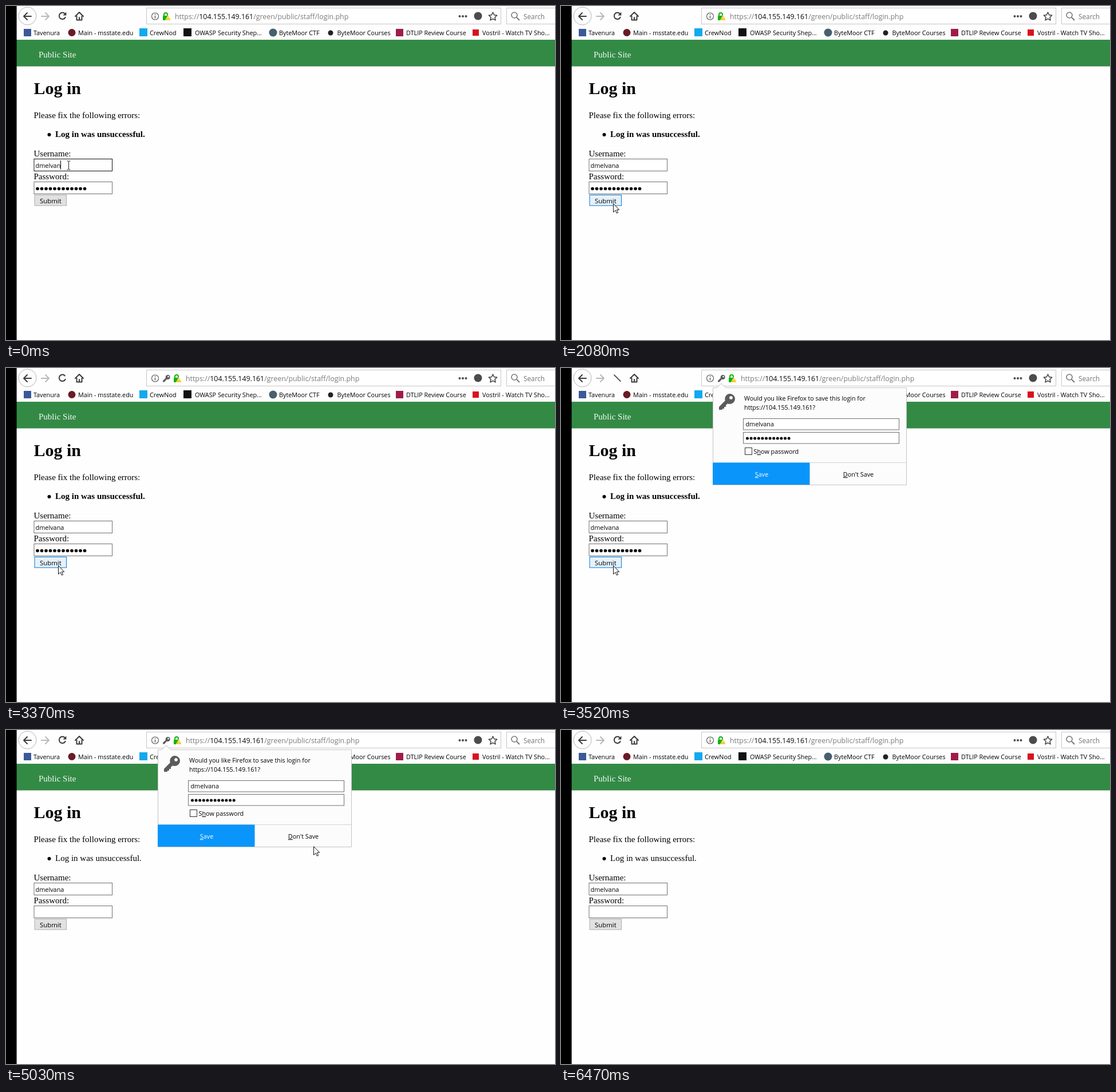
Write an HTML page that moves like this. It is 959 by 584 pixels and loops after 7310 ms.

```html
<!DOCTYPE html>
<html lang="en">
<head>
<meta charset="utf-8">
<title>Log in</title>
<style>
html, body { margin: 0; width: 100%; height: 100%; overflow: hidden; background: #fefefe; }
svg { display: block; }
text { font: 10.8px "Open Sans", "Noto Sans", sans-serif; white-space: pre; }
.page text { font: 15px "Liberation Serif", "Times New Roman", serif; }
.page .ui { font: 10.9px "Open Sans", "Noto Sans", sans-serif; }
.page .submit { font-size: 11.4px; }
.page .title { font-size: 30px; font-weight: bold; }
.url { font-size: 12.4px; fill: #7b7b7b; }
.url tspan { fill: #0c0c0d; }
.search { font-size: 11.8px; fill: #737373; }
.ask { font-size: 10.65px; }
.icon { fill: none; stroke: #3c3c40; stroke-width: 2; stroke-linecap: round; stroke-linejoin: round; }
.box { fill: #fff; stroke: #707070; }
.mid { text-anchor: middle; }
.u { text-decoration: underline; }
</style>
</head>
<body>
<svg width="959" height="584" viewBox="0 0 959 584">
  <defs>
    <g id="key">
      <path fill-rule="evenodd" d="M19 0a9 9 0 0 1 0 18a9 9 0 0 1-4-.8L12 20v3H9v3H6v2H0v-5L10.800 12A9 9 0 0 1 19 0zM21 4a3 3 0 1 0 .01 0z" fill="#5b5b5e"/>
    </g>
  </defs>
  <rect width="959" height="584" fill="#fefefe"/>

  <!-- toolbar -->
  <circle cx="37.500" cy="17.500" r="15.500" fill="#fdfdfd" stroke="#b4b4b4"/>
  <path class="icon" d="M44 18H31M37 12l-6 6l6 6"/>
  <path class="icon" d="M62 18H75M69 12l6 6l-6 6" style="stroke:#b9b9b9"/>
  <g class="icon" transform="translate(.4 -.4)">
    <path id="arc" d="M103.300 20.200A5.700 5.700 0 1 1 102.500 14"/>
    <path id="head" d="M105 11v6h-6z" fill="#3c3c40" stroke="none"/>
    <path id="slash" d="M92.500 12.500L103.500 23.500" stroke-width="1.500"/>
    <path id="cross" d="M103.500 12.500L92.500 23.500" stroke-width="1.500"/>
  </g>
  <path class="icon" d="M121 18l7-7l7 7M123.500 18v6.500h9v-6.500M128 24v-4"/>
  <rect x="245.500" y="3.500" width="619" height="28" fill="#fff" stroke="#c6c6c6"/>
  <circle cx="260.500" cy="18" r="6" fill="none" stroke="#5e5e5e" stroke-width="1.200"/>
  <path d="M260.500 17v4.500M260.500 14v1.600" stroke="#5e5e5e" stroke-width="1.500"/>
  <use id="urlKey" href="#key" transform="translate(274 12) scale(.45)"/>
  <g id="address">
    <path d="M276 17v-2a3 3 0 0 1 6 0v2" fill="none" stroke="#12b20f" stroke-width="2"/>
    <rect x="274" y="17" width="10" height="8" rx="1" fill="#12b20f"/>
    <path d="M283 16l4.800 9h-9.600z" fill="#ffbf00" stroke="#fff" stroke-width=".6"/>
    <path d="M283 19v3M283 23v1" stroke="#fff"/>
    <text class="url" x="295" y="23">https://<tspan>104.155.149.161</tspan>/green/public/staff/login.php</text>
  </g>
  <g fill="#4b4b4f">
    <circle cx="792.500" cy="18" r="2"/><circle cx="798" cy="18" r="2"/><circle cx="803.500" cy="18" r="2"/>
    <circle cx="824.500" cy="17.500" r="7"/>
  </g>
  <path class="icon" style="stroke-width:1.500" d="M850.500 11l2.200 4.700l5 .6l-3.700 3.500l1 5l-4.500-2.500l-4.500 2.500l1-5l-3.700-3.500l5-.6z"/>
  <path d="M960 3.500H874.500V31.500H960" fill="#fff" stroke="#c6c6c6"/>
  <path d="M892 20l5 5" stroke="#777" stroke-width="2"/>
  <circle cx="888" cy="16" r="5" fill="none" stroke="#777" stroke-width="1.600"/>
  <text class="search" x="904" y="23">Search</text>

  <!-- bookmarks -->
  <rect x="31" y="40" width="13" height="13" fill="#3b5998"/>
  <circle cx="115" cy="46.500" r="6.500" fill="#6b1a26"/>
  <rect x="233" y="39" width="14" height="14" fill="#12a9ee"/>
  <rect x="310" y="39" width="14" height="14" fill="#111"/>
  <circle cx="466.500" cy="46.500" r="7" fill="#46606e"/>
  <circle cx="567" cy="47" r="4.500" fill="#222"/>
  <rect x="681" y="40" width="13" height="13" fill="#a01c46"/>
  <rect x="815" y="41" width="11" height="11" fill="#d8131c"/>
  <g id="bookmarks" fill="#000"></g>

  <!-- page -->
  <rect x="18" y="59" width="941" height="46" fill="#338a45"/>
  <path d="M18 105H959" stroke="#2f8040"/>
  <rect width="18.600" height="584"/>
  <g class="page">
    <text x="57" y="90" fill="#f4faf5">Public Site</text>
    <text class="title" x="48.500" y="154">Log in</text>
    <text x="48.500" y="196">Please fix the following errors:</text>
    <circle cx="75.500" cy="225" r="3"/>
    <text id="error" x="86" y="229">Log in was unsuccessful.</text>
    <text x="48.500" y="263">Username:</text>
    <rect id="user" class="box" x="49" y="267.500" width="136.500" height="21"/>
    <text id="name" class="ui" x="51.500" y="283"></text>
    <path id="caret" d="M.5 270v16" stroke="#000"/>
    <text x="48.500" y="303">Password:</text>
    <rect id="pass" class="box" x="49" y="307.500" width="136.500" height="21"/>
    <g id="dots"></g>
    <rect id="button" x="50" y="330.500" width="55.500" height="18.500"/>
    <text id="label" class="ui submit" y="345">Submit</text>
  </g>

  <!-- save prompt -->
  <g id="prompt">
    <path d="M265.500 34.500H272L280 27L288 34.500H603.500V204.500H265.500Z" fill="#fcfcfd" stroke="#c3c3c5"/>
    <use href="#key" transform="translate(276 45)"/>
    <text class="ask" x="320" y="57">Would you like Firefox to save this login for</text>
    <text x="320" y="73">https://104.155.149.161?</text>
    <rect class="box" x="318.500" y="88.500" width="272" height="19.500"/>
    <text x="322.500" y="102">dmelvana</text>
    <rect class="box" x="318.500" y="112.500" width="272" height="19.500"/>
    <g id="promptDots"></g>
    <rect class="box" x="321.500" y="139.500" width="12" height="12" style="stroke:#333"/>
    <text x="336.500" y="150">S<tspan class="u">h</tspan>ow password</text>
    <rect id="deny" x="435" y="166" width="168" height="38"/>
    <path d="M265 165.500H603" stroke="#d4d4d6"/>
    <rect x="265" y="165.500" width="169.500" height="38.500" fill="#0a95fb"/>
    <text class="mid" x="350.500" y="190" fill="#fff"><tspan class="u">S</tspan>ave</text>
    <text class="mid" x="519.500" y="190"><tspan class="u">D</tspan>on't Save</text>
  </g>

  <path id="beam" d="M-3-7.500h2.500l.5.500l.5-.5h2.500M0-7V7M-3 7.500h2.500l.5-.5l.5.500h2.500" fill="none" stroke="#222"/>
  <path id="arrow" d="M.5.700V15.500L4 12.200L6.300 17.300L8.600 16.300L6.300 11.300H10.700Z" fill="#fff" stroke="#111"/>
</svg>
<script>
const LOOP = 7310;
const $ = id => document.getElementById(id);
const show = (id, on) => $(id).style.display = on ? "" : "none";
const move = (id, pos) => {
  show(id, pos);
  if (pos) $(id).setAttribute("transform", `translate(${pos})`);
};
const paint = (id, [fill, stroke]) => {
  $(id).style.fill = fill;
  $(id).style.stroke = stroke;
};

// Each track lists [start, value]; the latest started value holds.
const at = (track, t) => track.findLast(([start]) => start <= t)[1];

const bookmarks = [
  [48, "Tavenura"], [126, "Main - msstate.edu"], [251, "CrewNod"],
  [330, "OWASP Security Shep..."], [477, "ByteMoor CTF"], [578.5, "ByteMoor Courses"],
  [699, "DTLIP Review Course"], [832, "Vostril - Watch TV Sho..."]
];
$("bookmarks").innerHTML = bookmarks.map(([x, s]) => `<text x="${x}" y="50.500">${s}</text>`).join("");

const dots = (x, y, gap, r) => Array.from({ length: 12 }, (_, i) =>
  `<circle cx="${x + i * gap}" cy="${y}" r="${r}"/>`).join("");
$("dots").innerHTML = dots(55, 319.5, 7.5, 2.8);
$("promptDots").innerHTML = dots(325.5, 123, 6.6, 2.5);

const idle = ["#fff", "#707070"], hover = ["#fff", "#111"], focus = ["#fff", "#0078d7"];
const tracks = {
  beam: [[0, [109.5, 278.5]], [290, [135.5, 296.5]], [410, [170.5, 316.5]], [550, null]],
  arrow: [
    [0, null], [1100, [214, 383]], [1250, [172, 397]], [1380, [122, 373]], [1530, [101, 356]],
    [1680, [94, 349]], [1810, [91, 346]], [1960, [91, 345]], [4360, [104, 344]],
    [4510, [532, 236]], [4660, [534, 225]], [4780, [536, 214]], [4910, [537, 207]],
    [5030, [537, 203]], [5170, [537, 191]], [5420, [537, 190]], [5570, [538, 197]],
    [5690, [541, 222]], [5810, [558, 310]], [5930, [596, 405]], [6050, [629, 459]],
    [6200, [632, 461]], [6350, [756, 448]], [6470, null]
  ],
  caret: [
    [0, [95, 0]], [410, null], [830, [95, 0]], [950, [101, 0]], [1100, null],
    [1530, [101, 0]], [2080, null], [2510, [101, 0]], [2920, null]
  ],
  user: [[0, hover], [290, focus], [1100, idle]],
  pass: [[0, idle], [410, hover], [1100, idle]],
  button: [
    [0, ["#e1e1e1", "#adadad"]], [1680, ["#e5f1fb", "#0078d7"]], [3220, ["#cce4f7", "#005499"]],
    [3370, ["#e5f1fb", "#0078d7"]], [4510, ["#e1e1e1", "#adadad"]]
  ],
  deny: [[0, ["#fcfcfd", "none"]], [5170, ["#ececee", "none"]], [5420, ["#dbdbdd", "none"]]],
  reload: [
    [0, "arc head"], [3370, "arc"], [3520, "slash"], [3670, "slash cross"],
    [3940, "slash"], [4060, "arc"], [4210, "arc head"]
  ]
};

function draw(t) {
  const within = (a, b) => t >= a && t < b;
  const loaded = t >= 3670;
  const saving = within(3370, 5570);
  for (const id of ["beam", "arrow", "caret"]) move(id, at(tracks[id], t));
  for (const id of ["user", "pass", "button", "deny"]) paint(id, at(tracks[id], t));
  const parts = at(tracks.reload, t).split(" ");
  for (const id of ["arc", "head", "slash", "cross"]) show(id, parts.includes(id));
  $("name").textContent = t < 950 ? "dmelvan" : "dmelvana";
  $("error").style.fontWeight = loaded ? "normal" : "bold";
  $("label").setAttribute("x", within(3220, 3370) ? 60 : 59);
  show("dots", !loaded);
  show("urlKey", saving);
  move("address", [saving ? 19 : 0, 0]);
  show("prompt", within(3520, 5570));
}

const begin = performance.now();
function tick() {
  draw((performance.now() - begin) % LOOP);
  requestAnimationFrame(tick);
}
tick();
</script>
</body>
</html>
```
